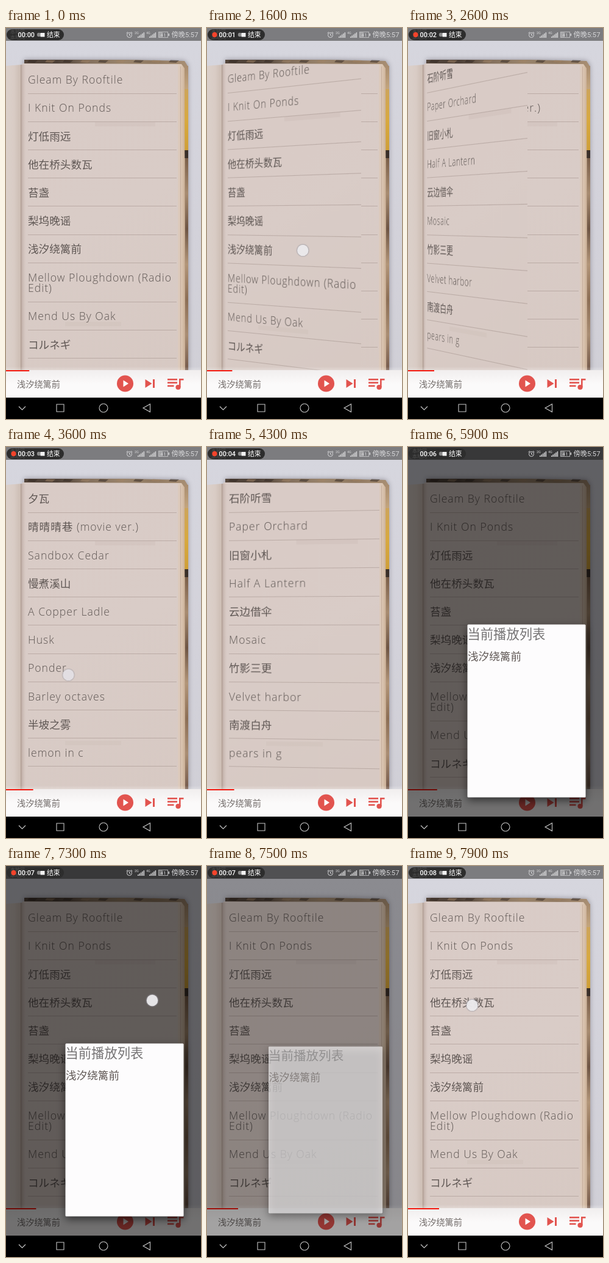
These frames come from a looping animation (320 by 640 pixels, 8 s). An HTML page with a canvas:

```html
<!DOCTYPE html>
<html lang="zh">
<head>
<meta charset="utf-8">
<style>
html, body { margin: 0; width: 100%; height: 100%; overflow: hidden; background: #000; }
canvas { display: block; width: 100vw; height: 100vh; }
</style>
</head>
<body>
<canvas id="stage" width="320" height="640"></canvas>
<script>
const W = 320, H = 640, LOOP = 8000, NAV = 605;
const ctx = document.getElementById('stage').getContext('2d');
const HAND = '"Open Sans", "Noto Sans CJK SC", sans-serif';
const SANS = 'Roboto, "Noto Sans CJK SC", sans-serif';
const INK = '#5f5754', RED = '#e2544f';
const TITLE = '浅汐绕篱前';

const PAGES = [
  ['Gleam By Rooftile', 'I Knit On Ponds', '灯低雨远', '他在桥头数瓦', '苔盏', '梨坞晚谣', TITLE,
    'Mellow Ploughdown (Radio|Edit)', 'Mend Us By Oak', 'コルネギ'],
  ['石阶听雪', 'Paper Orchard', '旧窗小札', 'Half A Lantern', '云边借伞', 'Mosaic', '竹影三更',
    'Velvet harbor', '南渡白舟', 'pears in g'],
  ['夕瓦', '晴晴晴巷 (movie ver.)', 'Sandbox Cedar', '慢煮溪山', 'A Copper Ladle', 'Husk', 'Ponder',
    'Barley octaves', '半坡之雾', 'lemon in c']
];

// Page sheet geometry: hinge, right edge, top, bottom and camera distance
const SHEET = { x: 25, r: 280, top: 60, bottom: 560, mid: 310, eye: 1420 };

// Time/value pairs: page position, dialog opening
const TURN = [200, 0, 450, .35, 950, 0, 1480, 0, 1600, .41, 2050, 1, 2300, 1, 2420, 1.41,
  2950, 2, 3650, 2, 4350, 1, 4480, 1, 4900, 0];
const DIALOG = [5550, 0, 5820, 1, 7400, 1, 7680, 0];

// start, end, x from, x to, y
const TOUCHES = [
  [220, 800, 210, 150, 366], [1480, 1750, 220, 80, 364], [2300, 2560, 220, 80, 366],
  [3560, 3900, 84, 237, 373], [4430, 4690, 100, 240, 370], [5460, 5620, 277, 277, 582],
  [7240, 7430, 240, 240, 220], [7840, 8060, 95, 132, 228]
];

const clamp = v => Math.max(0, Math.min(1, v));

function track(t, keys) {
  if (t <= keys[0]) return keys[1];
  for (let i = 2; i < keys.length; i += 2) {
    if (t < keys[i]) {
      const p = (t - keys[i - 2]) / (keys[i] - keys[i - 2]);
      return keys[i - 1] + (keys[i + 1] - keys[i - 1]) * p;
    }
  }
  return keys[keys.length - 1];
}

function rect(c, x, y, w, h, fill) {
  c.fillStyle = fill;
  c.fillRect(x, y, w, h);
}

function disc(c, x, y, r, fill) {
  c.fillStyle = fill;
  c.beginPath();
  c.arc(x, y, r, 0, 7);
  c.fill();
}

function poly(c, pts, fill) {
  c.fillStyle = fill;
  c.beginPath();
  for (let i = 0; i < pts.length; i += 2) c.lineTo(pts[i], pts[i + 1]);
  c.closePath();
  c.fill();
}

function label(c, s, x, y, size, fill, family = SANS, gap = 0, weight = 400) {
  c.font = `${weight} ${size}px ${family}`;
  c.letterSpacing = gap + 'px';
  c.fillStyle = fill;
  c.fillText(s, x, y);
}

function blend(c, x0, y0, x1, y1, ...stops) {
  const g = c.createLinearGradient(x0, y0, x1, y1);
  stops.forEach((s, i) => g.addColorStop(i / (stops.length - 1), s));
  return g;
}

function handwrite(c, s, x, y) {
  const latin = /[a-z]/.test(s);
  label(c, s, x, y, 17.6, INK, HAND, latin ? 1 : 0, latin ? 300 : 400);
}

function drawBook(c) {
  rect(c, 0, 21, W, NAV - 21, blend(c, 0, 21, 0, 600, '#d6d6de', '#d3d2da', '#d0cfd6'));
  // cover with a soft shadow on the table
  c.save();
  c.shadowColor = 'rgba(70,65,75,.5)';
  c.shadowBlur = 9;
  poly(c, [30, 52, 200, 52, 293, 54, 298, 62, 299, 560, 285, 580, 30, 580],
    blend(c, 30, 0, 298, 0, '#54463c', '#4c3f36', '#84705d', '#9a846c', '#8f7860', '#a98f74'));
  c.restore();
  for (let i = 0; i < 9; i++) {
    poly(c, [38 + i * 29, 52.5, 52 + i * 29, 53, 47 + i * 29, 57, 35 + i * 29, 56],
      i % 2 ? 'rgba(160,130,100,.5)' : 'rgba(45,36,32,.5)');
  }
  rect(c, 292, 62, 7, 40, blend(c, 0, 62, 0, 102, '#a98d70', '#c5a67d'));
  rect(c, 293, 100, 6, 100, blend(c, 0, 100, 0, 200, '#cda45a', '#d8a93e', '#cf9f37'));
  rect(c, 293, 200, 6, 13, '#3a2f28');
  rect(c, 294, 213, 5, 347,
    blend(c, 0, 213, 0, 560, '#7b5f49', '#a78b70', '#6e5544', '#b29578', '#8c6e55', '#a98d73', '#74594a'));
  // page edges
  poly(c, [27, 58, 288, 59, 293, 66, 294, 560, 27, 560],
    blend(c, 278, 0, 294, 0, '#d9cbc5', '#dccabd', '#d9c3ae', '#c9ae95'));
  rect(c, 286, 63, 1, 497, 'rgba(160,130,110,.35)');
  // left page
  poly(c, [0, 62, 26, 60, 26, 560, 0, 560], blend(c, 0, 0, 26, 0, '#dbd0ca', '#d9ccc5', '#cabab0'));
  // right page
  rect(c, 25, 60, 257, 500, blend(c, 25, 60, 282, 560, '#d9cbc6', '#d9ccc7', '#d7c9c3'));
  rect(c, 24, 60, 9, 500,
    blend(c, 24, 0, 33, 0, 'rgba(135,110,98,.45)', 'rgba(165,142,130,.2)', 'rgba(190,170,160,0)'));
  // show-through print
  rect(c, 146, 154, 99, 7, 'rgba(130,110,105,.06)');
  rect(c, 97, 481, 92, 7, 'rgba(130,110,105,.05)');
}

function makePage(items) {
  const cv = document.createElement('canvas');
  cv.width = W;
  cv.height = H;
  const c = cv.getContext('2d');
  drawBook(c);
  let y = 60.9;
  for (const item of items) {
    const rows = item.split('|');
    y += 46.2 + (rows.length - 1) * 17.6;
    rows.forEach((s, i) => handwrite(c, s, 36, y - 16 - (rows.length - 1 - i) * 17));
    rect(c, 36, Math.floor(y), 244, 1, 'rgba(150,132,124,.45)');
  }
  return cv;
}

const sheets = PAGES.map(makePage);

function drawPages(pos) {
  const n = Math.min(Math.floor(pos), 2), part = pos - n;
  if (part < .001) {
    ctx.drawImage(sheets[n], 0, 0);
    return;
  }
  ctx.drawImage(sheets[n + 1], 0, 0);
  const { x, r, top, bottom, mid, eye } = SHEET;
  const a = part * Math.PI / 2, cos = Math.cos(a), k = Math.sin(a) / eye;
  const source = dx => dx / (cos + dx * k);
  ctx.save();
  ctx.beginPath();
  ctx.rect(x, top, W, bottom - top);
  ctx.clip();
  for (let dx = 0; ; dx++) {
    const u = source(dx), next = source(dx + 1);
    if (next > r - x) break;
    const s = 1 / (1 - (u + next) / 2 * k);
    ctx.drawImage(sheets[n], x + u, top, next - u, bottom - top,
      x + dx, mid - (mid - top) * s, 1, (bottom - top) * s);
  }
  ctx.restore();
}

function drawPlayer(t) {
  rect(ctx, 0, 554, W, 6, blend(ctx, 0, 554, 0, 560, 'rgba(255,255,255,0)', 'rgba(255,255,255,.25)'));
  rect(ctx, 0, 560, W, NAV - 560, blend(ctx, 0, 560, 0, NAV, '#f1eeee', '#fbfafa', '#fbfafa'));
  rect(ctx, 0, 560, 38.2 + 1.6 * Math.floor((t + 600) / 1000), 2, '#f4190f');
  label(ctx, TITLE, 18, 588, 14.2, '#6f6967');
  disc(ctx, 195.5, 582, 13.5, RED);
  poly(ctx, [192.5, 576.5, 192.5, 587.5, 201, 582], '#fff');
  poly(ctx, [228.5, 575, 228.5, 589, 239.5, 582], RED);
  rect(ctx, 241, 575, 3, 14, RED);
  rect(ctx, 265, 574, 16, 2.6, RED);
  rect(ctx, 265, 579.3, 16, 2.6, RED);
  rect(ctx, 265, 584.6, 10.5, 2.6, RED);
  rect(ctx, 284, 574, 2.6, 14, RED);
  rect(ctx, 284, 574, 7.5, 2.6, RED);
  disc(ctx, 282.5, 588, 4.1, RED);
}

function drawDialog(v) {
  if (v <= 0) return;
  rect(ctx, 0, 0, W, NAV, `rgba(0,0,0,${.55 * v})`);
  ctx.save();
  ctx.globalAlpha = v;
  const s = .9 + .1 * v;
  ctx.translate(194.5, 432);
  ctx.scale(s, s);
  ctx.translate(-194.5, -432);
  ctx.shadowColor = 'rgba(0,0,0,.55)';
  ctx.shadowBlur = 14;
  ctx.shadowOffsetY = 5;
  ctx.fillStyle = '#fdfcfd';
  ctx.beginPath();
  ctx.roundRect(97.5, 290.5, 194, 283, 1.5);
  ctx.fill();
  ctx.shadowColor = 'transparent';
  label(ctx, '当前播放列表', 97.5, 314, 21.3, '#757374');
  handwrite(ctx, TITLE, 98, 348.5);
  ctx.restore();
}

function drawStatus(t) {
  const tick = (t + 200) / 1000, sec = Math.floor(tick);
  ctx.fillStyle = '#2d2d2d';
  ctx.beginPath();
  ctx.roundRect(1, 2, 94, 18, 9);
  ctx.fill();
  label(ctx, '本地网', 7, 9, 8, 'rgba(255,255,255,.16)');
  label(ctx, '本地网', 7, 18, 8, 'rgba(255,255,255,.16)');
  if (tick - sec >= .5) disc(ctx, 12.5, 11, 4.2, '#f4442c');
  label(ctx, '00:0' + sec, 19.5, 15, 10.8, '#fff', SANS, 0, 500);
  disc(ctx, 54, 11, 3.2, '#8b8b8b');
  rect(ctx, 56.5, 8, 7, 6.5, '#f2f2f2');
  label(ctx, '结束', 67, 15, 10.8, '#fff', SANS, 0, 500);

  const pale = '#d6d6d8';
  ctx.strokeStyle = pale;
  ctx.lineWidth = 1;
  ctx.beginPath();
  ctx.arc(202.5, 11.5, 4, 0, 7);
  ctx.moveTo(202.5, 9);
  ctx.lineTo(202.5, 12);
  ctx.lineTo(204.5, 12);
  ctx.moveTo(197.5, 8.5);
  ctx.lineTo(200, 6.5);
  ctx.moveTo(207.5, 8.5);
  ctx.lineTo(205, 6.5);
  ctx.stroke();
  for (const [x, s] of [[211, '2G'], [230, '4G']]) {
    label(ctx, s, x, 9.5, 5.5, pale);
    for (let i = 0; i < 5; i++) rect(ctx, x + 5 + i * 2.4, 14 - i * 1.7, 1.5, 2 + i * 1.7, pale);
  }
  ctx.strokeStyle = 'rgba(214,214,216,.7)';
  ctx.strokeRect(250.5, 6.5, 15, 9);
  rect(ctx, 251, 7, 6, 8, 'rgba(255,255,255,.3)');
  rect(ctx, 266.5, 9, 1.5, 4, pale);
  label(ctx, '41', 253.5, 14, 8, pale);
  label(ctx, '傍晚5:57', 271.5, 15, 11.2, pale);
}

function drawNav() {
  rect(ctx, 0, NAV, W, H - NAV, '#000');
  ctx.strokeStyle = '#c8c8c8';
  ctx.lineWidth = 1.1;
  ctx.beginPath();
  ctx.moveTo(21, 619.5);
  ctx.lineTo(26.5, 625);
  ctx.lineTo(32, 619.5);
  ctx.rect(83, 616, 12, 12);
  ctx.moveTo(167, 622);
  ctx.arc(160, 622, 7, 0, 7);
  ctx.moveTo(236.5, 615.5);
  ctx.lineTo(225, 622);
  ctx.lineTo(236.5, 628.5);
  ctx.closePath();
  ctx.stroke();
}

function drawTouch(t) {
  for (const [t0, t1, x0, x1, y] of TOUCHES) {
    if (t < t0 || t > t1) continue;
    const x = x0 + (x1 - x0) * (t - t0) / (t1 - t0);
    ctx.globalAlpha = Math.min(clamp((t - t0) / 50), clamp((t1 - t) / 60));
    disc(ctx, x, y, 11, 'rgba(150,150,160,.2)');
    disc(ctx, x, y, 10, 'rgba(160,158,166,.55)');
    disc(ctx, x, y, 9.2, 'rgba(240,238,241,.9)');
    ctx.globalAlpha = 1;
  }
}

function render(t) {
  drawPages(track(t, TURN));
  rect(ctx, 0, 0, W, 21, '#7c7c7f');
  drawPlayer(t);
  drawDialog(track(t, DIALOG));
  drawStatus(t);
  drawNav();
  drawTouch(t);
}

const start = performance.now();
function loop() {
  render((performance.now() - start) % LOOP);
  requestAnimationFrame(loop);
}
loop();
</script>
</body>
</html>
```
